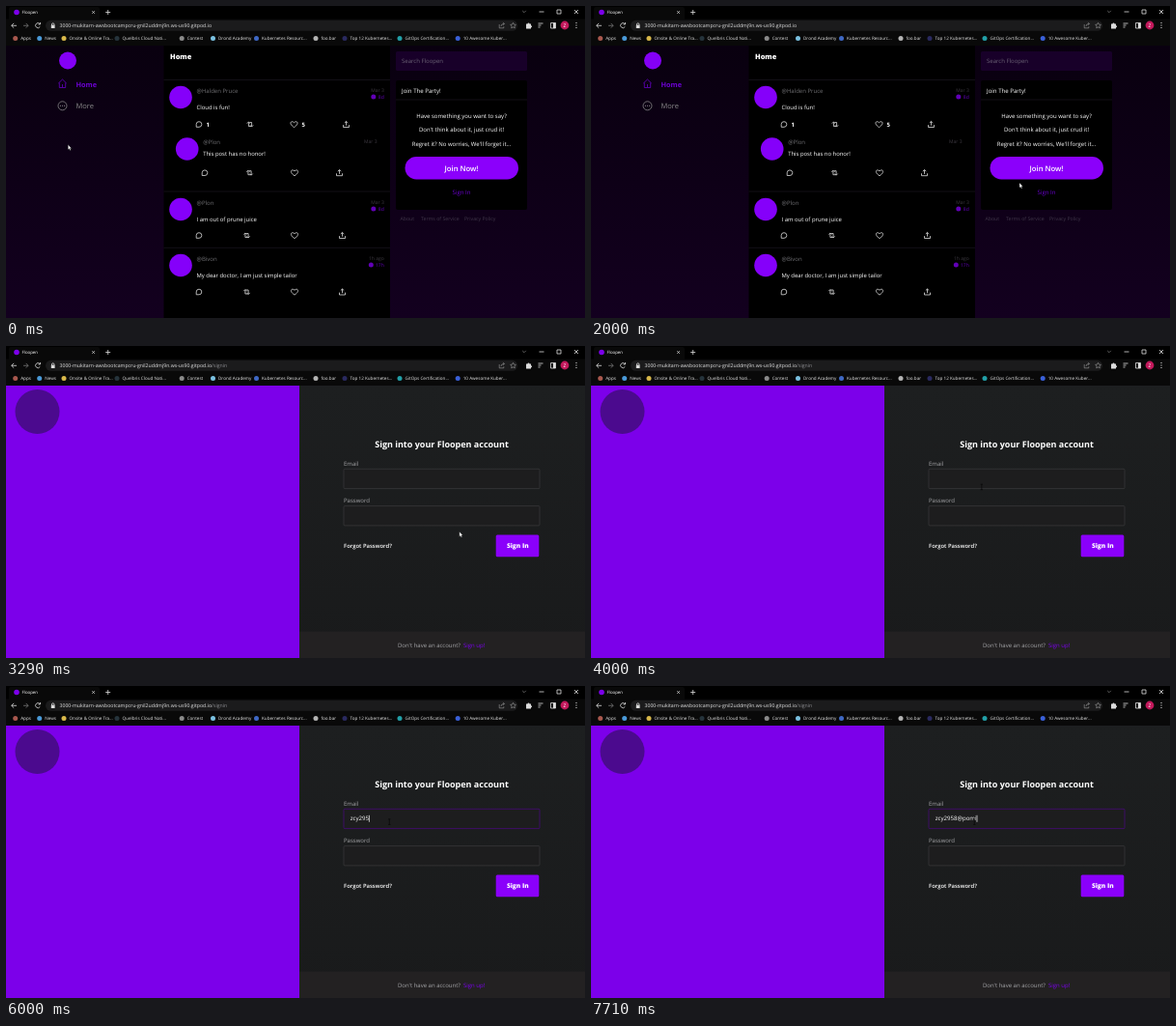
These frames come from a looping animation (600 px wide and 323 px high, 8 s). An HTML page:

```html
<!DOCTYPE html>
<html lang="en">
<head>
<meta charset="utf-8">
<title>Floopen</title>
<style>
  html, body { margin: 0; height: 100%; overflow: hidden; background: #000; }
  svg { display: block; width: 100vw; height: 100vh; }
  text { font: 6px "Open Sans", "Noto Sans", sans-serif; fill: #fff; text-rendering: geometricPrecision; white-space: pre; }
  .line { fill: none; stroke: #ddd; stroke-width: .8; }
  .mid { text-anchor: middle; }
  .end { text-anchor: end; }
  .dim { fill: #6e6e72; }
  .label { fill: #a5a5a8; }
  .time { font-size: 5px; fill: #3c3840; }
  .left { font-size: 5px; fill: #6200b8; }
  .link { fill: #6b00d0; }
  .foot { font-size: 5.2px; fill: #40364a; }
  .mark { font-size: 4.6px; fill: #e6e6e6; }
  .field { fill: #1d1d1e; stroke: #3b3b3d; stroke-width: .7; }
  .rule { stroke: #1b1622; stroke-width: .7; }
</style>
</head>
<body>
<svg viewBox="0 0 600 323">
  <defs>
    <linearGradient id="night" x2="0" y2="1">
      <stop stop-color="#09000f"/><stop offset="1" stop-color="#13001f"/>
    </linearGradient>
    <linearGradient id="slate" x2="0" y2="1">
      <stop stop-color="#1d1f20"/><stop offset="1" stop-color="#191a1b"/>
    </linearGradient>
    <path id="reply" d="M-2.8 2.8V0A2.8 2.8 0 1 1 0 2.8Z"/>
    <path id="repost" d="M-3.2-.9-1.6-2.5 0-.9M-1.6-2.3V2H1M3.2.9 1.6 2.5 0 .9M1.6 2.3V-2H-.6"/>
    <path id="heart" d="M0 3.1C-6.2-.9-3-4.6 0-1.8 3-4.6 6.2-.9 0 3.1Z"/>
    <path id="share" d="M-3 .6V3H3V.6M0 1.2V-3M-1.7-1.5 0-3.1 1.7-1.5"/>
  </defs>

  <g id="feed">
    <rect y="41" width="600" height="282" fill="url(#night)"/>
    <rect x="163.5" y="41" width="234.5" height="282"/>
    <circle cx="64" cy="56.5" r="9" fill="#8400f5"/>
    <path class="line" style="stroke:#6500c4" d="M54.3 80 58.5 76 62.7 80M55.3 79.5V84.5H61.7V79.5M58.5 81V84"/>
    <text x="72.5" y="83.5" class="link" style="font-size:7.3px;font-weight:700">Home</text>
    <circle cx="58.5" cy="103.3" r="4.5" class="line" style="stroke:#888"/>
    <path d="M56 103.3h1m1 0h1m1 0h1" stroke="#888"/>
    <text x="72.5" y="106.2" style="font-size:7.5px;fill:#888">More</text>
    <text x="170" y="55" style="font-size:7.4px;font-weight:800">Home</text>
    <path class="rule" d="M163.5 76.5H398M163.5 192H398M163.5 250.3H398"/>
    <g id="posts"></g>

    <rect x="404" y="47" width="136" height="20" rx="1.5" fill="#180029"/>
    <text x="410" y="59.2" style="fill:#6b6175">Search Floopen</text>
    <rect x="404" y="77" width="136" height="134" rx="2"/>
    <text x="410" y="89.5" style="font-size:6.1px">Join The Party!</text>
    <path class="rule" d="M404 97H540"/>
    <g class="mid">
      <text x="472" y="115.6">Have something you want to say?</text>
      <text x="472" y="130.3">Don't think about it, just crud it!</text>
      <text x="472" y="145">Regret it? No worries, We'll forget it...</text>
      <rect x="413.5" y="156" width="117.5" height="23.5" rx="11.75" fill="#8b00fb"/>
      <text x="472" y="170.6" style="font-size:7.7px;font-weight:600">Join Now!</text>
      <text x="472" y="195.4" class="link" style="font-size:6.1px">Sign In</text>
    </g>
    <text x="408.5" y="221.5" class="foot">About</text>
    <text x="430" y="221.5" class="foot">Terms of Service</text>
    <text x="475" y="221.5" class="foot">Privacy Policy</text>
  </g>

  <g id="signin">
    <rect y="41" width="304" height="282" fill="#7c00ea"/>
    <circle cx="32.5" cy="68" r="23" fill="#4b0a8e"/>
    <rect x="304" y="41" width="296" height="282" fill="url(#slate)"/>
    <rect x="304" y="295.5" width="296" height="27.5" fill="#232122"/>
    <text x="451.5" y="105" class="mid" style="font-size:9px;font-weight:700">Sign into your Floopen account</text>
    <text x="350" y="124.3" class="label">Email</text>
    <rect id="email" x="350" y="127.3" width="203" height="20.3" rx="1" class="field"/>
    <text id="typed" x="356.7" y="139.4" style="font-size:6.1px"></text>
    <path id="caret" d="M0 133.8v7" stroke="#fff" stroke-width=".7"/>
    <text x="350" y="162.4" class="label">Password</text>
    <rect x="350" y="165.6" width="203" height="20.3" rx="1" class="field"/>
    <text x="350" y="209.4" style="font-size:5.9px;font-weight:600">Forgot Password?</text>
    <rect x="507.7" y="195.5" width="44.6" height="22.7" rx="1.5" fill="#8a00fb"/>
    <text x="530.3" y="209.2" class="mid" style="font-size:6.6px;font-weight:800">Sign In</text>
    <text x="406" y="312.2" class="label">Don't have an account?</text>
    <text x="474" y="312.2" style="fill:#7c00ee">Sign up!</text>
  </g>

  <g id="browser">
    <rect width="600" height="41"/>
    <path d="M3 13.5V3Q3 1 5 1H95Q97 1 97 3V13.5H600V41H0V13.5Z" fill="#090909"/>
    <circle cx="11" cy="6.5" r="2.8" fill="#7c00ea"/>
    <text x="16.5" y="8.3" style="font-size:4.4px">Floopen</text>
    <rect x="41" y="14.8" width="489" height="11" rx="5.5" fill="#1b1b1c"/>
    <text x="55.5" y="22.2" style="font-size:5.18px;fill:#e4e4e4">3000-mukitarn-awsbootcampcru-gnil2uddmj9n.ws-us90.gitpod.io<tspan id="path" fill="#8e8e92">/signin</tspan></text>
    <g class="line">
      <path d="M89.3 5.2l2.6 2.6m0-2.6l-2.6 2.6M103.2 6.5h5M105.7 4v5M552.5 6h5M571 4h4v4h-4ZM589 4l4 4m0-4l-4 4"/>
      <path d="M11 20.3H5.7M8.1 17.9 5.7 20.3 8.1 22.7M35 18.5A2.5 2.5 0 1 0 35.3 21.3M35.5 17v2h-2"/>
      <path d="M18 20.3H23M20.7 17.9 23 20.3 20.7 22.7" stroke="#777"/>
      <path d="M47.5 20v-1a1.2 1.2 0 0 1 2.4 0v1M551.5 18h5M551.5 20h3M551.5 22h2M564.5 17.5h5v5.5h-5Z"/>
      <path d="M535.2 4.9l1.8 1.8 1.8-1.8M511.2 19v3.8h4.6v-1.6M513 21q0-2.6 3.3-2.6M515 16.9l1.5 1.5-1.5 1.5M525.5 17.3l.9 1.8 2 .3-1.5 1.4.4 2-1.8-.9-1.8.9.4-2-1.5-1.4 2-.3Z" stroke="#aaa" stroke-width=".55"/>
    </g>
    <path d="M46.8 19.8h3.8v3.2h-3.8ZM539 18.5h1.5a1 1 0 0 1 2 0h1.5v1.7a1 1 0 0 1 0 2v1.3h-5ZM567 17.5h2.5v5.5H567Z" fill="#ddd"/>
    <circle cx="579" cy="20" r="4.4" fill="#c2185b"/>
    <text x="579" y="21.8" class="mid" style="font-size:5px">Z</text>
    <path d="M591 17v1m0 1.5v1m0 1.5v1" stroke="#ddd" stroke-width="1.1"/>
  </g>

  <g id="pointer">
    <path id="arrow" d="M0 0V5.2L1.2 4.2 2 6 2.9 5.6 2.1 3.8H3.6Z" fill="#fff" stroke="#000" stroke-width=".3"/>
    <path id="hand" d="M-.7 0Q0-.6.7 0V2.6L2.9 3.2Q3.4 3.5 3.2 4.7L2.5 7.4H-.9L-2.5 4.6Q-2.4 3.7-1.4 4.2L-.7 4.8Z" fill="#fff" stroke="#000" stroke-width=".3"/>
    <path id="beam" d="M-1.2-2.8H1.2M0-2.8V2.8M-1.2 2.8H1.2" stroke="#050505" stroke-width=".6"/>
  </g>
</svg>
<script>
const $ = id => document.getElementById(id);
const show = (id, on) => $(id).style.display = on ? "" : "none";

const bookmarks = [
  [9.7, "#a8584e", "Apps"], [34.7, "#4a9ad8", "News"], [60, "#d8b84a", "Onsite & Online Tra..."],
  [115, "#26343c", "Quelbris Cloud Nati..."], [182.2, "#8a8a8a", "Contest"], [214.5, "#7ac0e0", "Drond Academy"],
  [259.5, "#3f68c4", "Kubernetes Resourc..."], [321, "#b4b4b4", "foo.bar"], [351, "#2a2a60", "Top 12 Kubernetes..."],
  [408, "#22a0a8", "GitOps Certification..."], [468.2, "#3a60d8", "10 Awesome Kuber..."]
];
$("browser").innerHTML += bookmarks.map(([x, color, label]) =>
  `<circle cx="${x}" cy="33.4" r="2.5" fill="${color}"/>
   <text x="${x + 5.5}" y="35.1" class="mark">${label.replace("&", "&amp;")}</text>`).join("");

const actions = ["reply", "repost", "heart", "share"];
function post(x, y, name, message, iconY, iconXs, age, ageX, left = "") {
  const icons = actions.map((id, i) =>
    `<use href="#${id}" x="${iconXs[i]}" y="${iconY}" class="line"/>`).join("");
  const expiry = left && `<circle cx="${ageX - 6 - left.length * 2.5}" cy="${y - .5}" r="2.5" fill="#6200b8"/>
    <text x="${ageX}" y="${y + 1.3}" class="left end">${left}</text>`;
  return `<circle cx="${x}" cy="${y}" r="11.8" fill="#8500fa"/>
    <text x="${x + 16.5}" y="${y - 5}" class="dim">@${name}</text>
    <text x="${x + 16.5}" y="${y + 12.6 - (left ? 0 : 6)}" style="font-size:5.92px">${message}</text>
    <text x="${ageX}" y="${y - 6}" class="time end">${age}</text>${expiry}${icons}`;
}
const wide = [200, 249.5, 299, 348.5];
$("posts").innerHTML =
  post(181, 94.5, "Halden Pruce", "Cloud is fun!", 122.5, [200, 253, 298.5, 352.5], "Mar 3", 391.8, "8d") +
  post(187.7, 148, "Plon", "This post has no honor!", 172.7, [206, 252.5, 299, 345.5], "Mar 3", 384.5) +
  post(181, 210.5, "Plon", "I am out of prune juice", 237.5, wide, "Mar 3", 391.8, "8d") +
  post(181, 268.5, "Bivon", "My dear doctor, I am just simple tailor", 296, wide, "1h ago", 391.8, "17h") +
  ["1", "5"].map((n, i) => `<text x="${207.5 + i * 99}" y="124.8" style="font-weight:700">${n}</text>`).join("");

// Time runs in ticks of 1/7 s; pointer stops are [tick, x, y].
const LOOP = 8000, SIGN_IN = 23, FOCUS = 29;
const stops = [[0, 64.3, 143.6], [3, 190, 155], [4, 190, 155], [9, 437, 180.7], [12, 437, 180.7],
  [19, 472.2, 192], [22, 472.2, 192], [23, 469.8, 192.2], [24, 469.8, 192.2], [29, 397.3, 140.6], [56, 397.3, 140.6]];
const address = "zcy2958@pomi";
const keyTicks = [33, 34, 36, 38, 40, 42, 45, 49, 50, 52, 53, 54];

function pointerAt(tick) {
  const i = stops.findIndex(s => s[0] > tick);
  const [t0, x0, y0] = stops[i - 1], [t1, x1, y1] = stops[i];
  const u = (tick - t0) / (t1 - t0), k = u * u * (3 - 2 * u);
  return [x0 + (x1 - x0) * k, y0 + (y1 - y0) * k];
}

function draw(ms) {
  const tick = Math.min(55, Math.floor(ms * 7 / 1000 + .05));
  const login = tick >= SIGN_IN, focus = tick >= FOCUS;
  show("feed", !login);
  show("signin", login);
  show("path", login);

  const [x, y] = pointerAt(tick);
  const onField = login && y > 127 && y < 147.6;
  const onLink = !login && x > 461 && y > 188;
  $("pointer").setAttribute("transform", `translate(${x} ${y})`);
  show("beam", onField);
  show("hand", onLink);
  show("arrow", !onField && !onLink);

  $("email").style.stroke = focus ? "#4d0a85" : "";
  $("typed").textContent = address.slice(0, keyTicks.filter(k => k <= tick).length);
  show("caret", focus);
  if (focus) $("caret").setAttribute("transform", `translate(${357.1 + $("typed").getComputedTextLength()} 0)`);
}

function loop() {
  draw(performance.now() % LOOP);
  requestAnimationFrame(loop);
}
loop();
</script>
</body>
</html>
```
